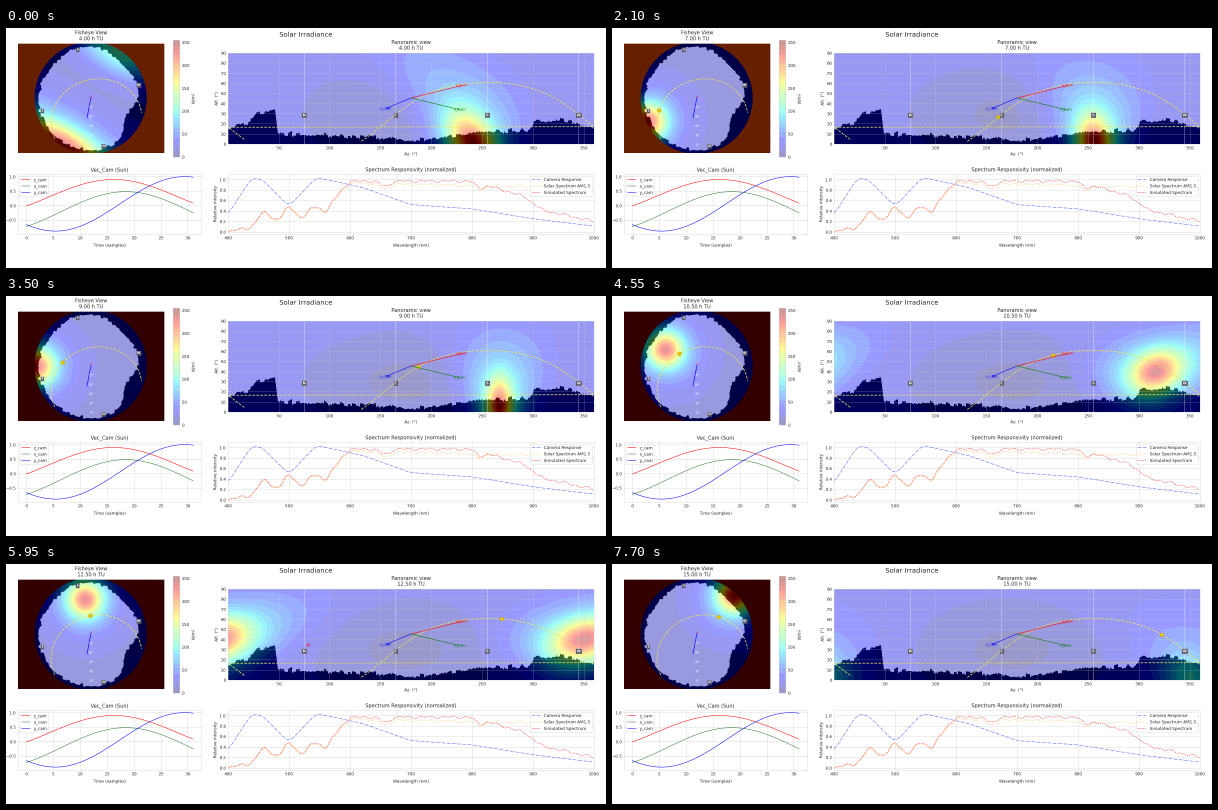
Recreate the animation shown at these times as a matplotlib script. Size 600x240 px, loop 8000 ms.

```python
import numpy as np
import matplotlib.pyplot as plt
from matplotlib.animation import FuncAnimation

W, H, DPI, SS = 600, 240, 30, 3
STEPS, HOLD, TICK, LOOP = 23, 350, 50, 8000
LAT, DEC, NOON, AZ0 = np.radians(51.5), np.radians(22.5), 12, 75
CX, CY, R = 84.5, 70, 56
LEVELS = 24

plt.rcParams.update({
    "font.family": "DejaVu Sans", "text.color": ".15", "axes.labelcolor": ".15",
    "xtick.color": ".15", "ytick.color": ".15", "axes.edgecolor": ".8",
    "grid.color": ".8", "grid.linewidth": .8, "axes.axisbelow": True,
    "xtick.major.size": 0, "ytick.major.size": 0, "xtick.major.pad": 5,
    "ytick.major.pad": 5, "lines.linewidth": 1.2, "legend.edgecolor": ".8",
    "axes.titlesize": 12,
})

fig = plt.figure(figsize=(W / DPI, H / DPI), dpi=DPI, facecolor="white")
jet = plt.get_cmap("jet")
rng = np.random.default_rng(4)


def box(x0, y0, x1, y1):
    return fig.add_axes([x0 / W, 1 - y1 / H, (x1 - x0) / W, (y1 - y0) / H])


def sun(hour):
    """Panorama azimuth (unwrapped) and altitude in degrees."""
    h = np.radians(15 * (np.asarray(hour, float) - NOON))
    alt = np.arcsin(np.sin(LAT) * np.sin(DEC) + np.cos(LAT) * np.cos(DEC) * np.cos(h))
    az = np.arctan2(np.sin(h), np.cos(h) * np.sin(LAT) - np.tan(DEC) * np.cos(LAT))
    return np.degrees(az) + 180 + AZ0, np.degrees(alt)


def dome(p, alt):
    """Panorama azimuth and altitude to fisheye pixels."""
    th, r = np.radians(np.asarray(p) - 270), R * (90 - np.asarray(alt)) / 90
    return CX + r * np.sin(th), CY - r * np.cos(th)


def wrap(a):
    return (a + 180) % 360 - 180


def gauss(u, v=0):
    return np.exp(-(u ** 2 + v ** 2) / 2)


def clumps(n, size, scale):
    """Blocky noise for tree lines."""
    return np.repeat(rng.normal(0, scale, n // size + 1), size)[:n]


def tint(base, value):
    """Banded jet overlay at 40 % on a grey base."""
    v = np.floor(np.clip(value, 0, .999) * LEVELS) / (LEVELS - 1)
    return .6 * base[..., None] + .4 * jet(v)[..., :3]


# Tree lines of both views
px, py = np.meshgrid(np.linspace(0, 360, 1098), np.linspace(90, 0, 273))
ridge = np.interp(px[0], [0, 20, 28, 46, 49, 140, 185, 255, 297, 302, 335, 360],
                  [15, 21, 31, 32, 10, 7, 3, 12, 13, 24, 22, 17])
ridge += clumps(1098, 12, 1) + clumps(1098, 4, .5)
land = (py > np.maximum(ridge, 1)).astype(float)

fx, fy = np.meshgrid(np.linspace(12, 158, 438), np.linspace(15.5, 125, 330))
rad = np.hypot(fx - CX, fy - CY)
ang = np.degrees(np.arctan2(fx - CX, CY - fy))
bearing = np.arange(-180, 181)
edge = 52.5 - 13 * gauss((bearing - 116) / 17) - 6 * gauss((bearing - 45) / 24) \
    - 3 * gauss((bearing + 50) / 18) + clumps(361, 3, .7)
sky = (rad < np.interp(ang, bearing, edge)).astype(float)


def key(hour, *values):
    return np.interp(hour, [4, 9, 11.5, 15], values)


def hot_alt(hour):
    return 46 - 6 * (hour - 11.5) ** 2


def pan_image(hour):
    alt = max(hot_alt(hour), 3)
    core = key(hour, 16, 8, 22, 18)
    d = wrap(px - key(hour, 240, 267, 350, 350))
    e = py - alt - key(hour, -.5, 0, .3, -.2) * d
    calm = gauss((px - 175) / 60, (py - 30) / 30)
    glow = .5 * gauss(d / core, e / (18 - alt / 9))
    haze = .35 * gauss(d / (14 + 1.2 * core) / (.8 + py / 120), e / (46 - .55 * alt))
    fade = np.clip((16 - hour) / 3, 0, 1)
    return tint(land, .1 - .07 * calm + fade * (glow + haze))


def fish_image(hour):
    x, y = dome(sun(hour)[0] - 8, max(hot_alt(hour) - 6, 4))
    n = np.hypot(x - CX, y - CY)
    ux, uy = (x - CX) / n, (y - CY) / n
    out = (fx - CX) * ux + (fy - CY) * uy
    side = ((fy - CY) * ux - (fx - CX) * uy) / (11 + 10 * np.clip(6 - hour, 0, 2))
    u = (out - n) / 11
    f = .075 + .52 * gauss(u, side) + .33 * gauss(u / 2, side / 1.9)
    # Before sunrise the opposite rim glows too
    f += .35 * np.clip(5 - hour, 0, 1) * gauss((out + n) / 14, side)
    rim = min(1, .39 + .28 * abs(hour - 5.5))
    return tint(sky, np.where(rad > R, rim, f))


def badge(ax, x, y, s, size):
    ax.text(x, y, s, size=size, color="white", weight="bold", ha="center", va="center",
            bbox=dict(boxstyle="square,pad=.25", fc="#555566", ec=".6", lw=.6))


def sun_marks(ax, p, alt):
    ax.plot(p, alt, "--", color="#e8e060", lw=1.8)
    return ax.plot([], [], "o", color="#e6c800", mec="#b89a00", ms=9)[0]


fig.text(.5, 1 - 7 / H, "Solar Irradiance", size=16, ha="center", va="center")
path_p, path_alt = sun(np.linspace(4.25, 19.5, 240))

# Fisheye view
fish = box(12, 15.5, 158, 125)
fish_im = fish.imshow(fish_image(4), extent=(12, 158, 125, 15.5), aspect="auto")
fish.axis("off")
for k in range(15, 76, 15):
    fish.text(CX + 1, CY + R * k / 90, f"{90 - k}°", size=7, color="white",
              ha="center", va="center")
fish.plot([85, 81], [69, 90], color="blue", lw=1.5)
fish.text(85.5, 68.5, "z", size=8, color="red", ha="center", va="center")
fish_sun = sun_marks(fish, *dome(path_p, path_alt))
fish_title = fish.set_title("", pad=8)

# Colour scale
bar = box(167, 12, 173.5, 129)
ramp = np.linspace(0, .999, 256)[::-1, None]
bar.imshow(tint(np.ones((256, 1)), ramp), extent=(0, 1, 0, 255), aspect="auto")
bar.set(xticks=[], yticks=range(0, 251, 50))
bar.yaxis.tick_right()
bar.yaxis.set_label_position("right")
bar.set_ylabel("W/m²")

# Panoramic view
pan = box(222, 25, 588, 116)
pan_im = pan.imshow(pan_image(4), extent=(0, 360, 0, 90), aspect="auto", zorder=0)
pan.set_axisbelow(False)
pan.grid(alpha=.55)
pan_sun = sun_marks(pan, path_p % 360, path_alt)
pan.set(xlim=(0, 360), ylim=(0, 90), xlabel="Az. (°)", ylabel="Alt. (°)",
        xticks=range(50, 351, 50), yticks=range(0, 91, 10))
for i, s in enumerate("NESW"):
    p = AZ0 + 90 * i
    pan.axvline(p, color="white", ls="--", lw=1)
    badge(pan, p, 28.5, s, 9)
    badge(fish, *dome(p, 10), s, 7)
for p, a, color, name in ((230, 58, "red", "z_cam"), (155, 35, "blue", "y_cam"),
                          (228, 34, "green", "x_cam")):
    pan.annotate("", (p, a), (180, 45.5),
                 arrowprops=dict(arrowstyle="-|>", color=color, lw=1.3,
                                 shrinkA=0, shrinkB=0, mutation_scale=8))
    pan.text(p, a, name, size=9, color=color, ha="center", va="center")
anti, = pan.plot([], [], "x", color="red", ms=6, mew=1.3)
pan_title = pan.set_title("", pad=8)

# Sun vector in the camera frame
vec = box(12, 146, 195.5, 206)
t = np.linspace(0, 31, 125)
for name, color, mid, amp, peak in (("z_cam", "red", .3, .6, 16.2),
                                    ("x_cam", "#2e7d32", -.205, .685, 18.5),
                                    ("y_cam", "blue", .06, .94, 29.4)):
    vec.plot(t, mid + amp * np.cos(2 * np.pi * (t - peak) / 48), color=color, label=name)
vec.grid()
vec.set(xlim=(-1.55, 32.55), ylim=(-.98, 1.09), xticks=range(0, 31, 5),
        yticks=[-.5, 0, .5, 1], title="Vec_Cam (Sun)")
vec.set_xlabel("Time (samples)", labelpad=7)
vec.legend(loc="upper left")

# Spectra
spec = box(222, 146, 588, 206)
nm = np.linspace(400, 1000, 601)


def curve(xs, ys, soft):
    """Smoothed polyline through a few points."""
    y = np.pad(np.interp(nm, xs, ys), soft, mode="edge")
    return np.convolve(y, np.hanning(2 * soft + 1) / soft, "valid")


cam = curve([400, 438, 455, 500, 545, 620, 700, 800, 900, 1000],
            [.33, 1.02, 1.01, .49, 1.04, .85, .52, .44, .25, .11], 13)
lines = .1 * np.sin(2 * np.pi * (nm - 446) / 43) * gauss((nm - 500) / 45) \
    - .1 * gauss((nm - 658) / 8) - .08 * gauss((nm - 812) / 7) \
    + .015 * np.sin(nm / 2.9) + .012 * np.sin(nm / 6)
rise_x, rise_y = [400, 430, 455, 560, 600], [.01, .06, .3, .43, .97]
solar = curve(rise_x + [1000], rise_y + [.87], 5) * .96 + lines
simulated = curve(rise_x + [800, 885, 915, 1000], rise_y + [.97, .68, .42, .2], 5) + lines
spec.plot(nm, cam, "-.", color="#4455ee", label="Camera Response")
spec.plot(nm, solar, ":", color="orange", label="Solar Spectrum AM1.5")
spec.plot(nm, np.clip(simulated, 0, 1), ":", color="red", lw=1.6,
          label="Simulated Spectrum")
spec.grid()
spec.set(xlim=(400, 1000), ylim=(-.04, 1.105), xticks=range(400, 1001, 100),
         yticks=np.arange(0, 1.1, .2), ylabel="Relative intensity",
         title="Spectrum Responsivity (normalized)")
spec.set_xlabel("Wavelength (nm)", labelpad=7)
spec.legend(loc="upper right")


def paint(step):
    hour = 4 + step / 2
    p, alt = sun(hour)
    x, y = dome(p, alt)
    fish_im.set_data(fish_image(hour))
    pan_im.set_data(pan_image(hour))
    fish_sun.set_data([x], [y])
    pan_sun.set_data([p % 360], [alt])
    for mark in (fish_sun, pan_sun):
        mark.set_visible(alt > 2)
    anti.set_data([(p - 190) % 360], [34.5])
    anti.set_visible(11 <= hour <= 13)
    fish_title.set_text(f"Fisheye View\n{hour:.2f} h TU")
    pan_title.set_text(f"Panoramic view\n{hour:.2f} h TU")
    fig.canvas.draw()
    rgb = np.asarray(fig.canvas.buffer_rgba())[..., :3]
    return rgb.reshape(H, SS, W, SS, 3).mean((1, 3)).round().astype(np.uint8)


# Paint each half hour once, oversampled, then play the results
fig.set_dpi(DPI * SS)
shots = [paint(i) for i in range(STEPS)]
fig.clear()
fig.set_dpi(DPI)
stage = fig.figimage(shots[0], origin="upper")


def update(i):
    stage.set_data(shots[min(i * TICK // HOLD, STEPS - 1)])
    return [stage]


anim = FuncAnimation(fig, update, frames=LOOP // TICK, interval=TICK,
                     repeat=True, repeat_delay=0)
plt.show()
```
